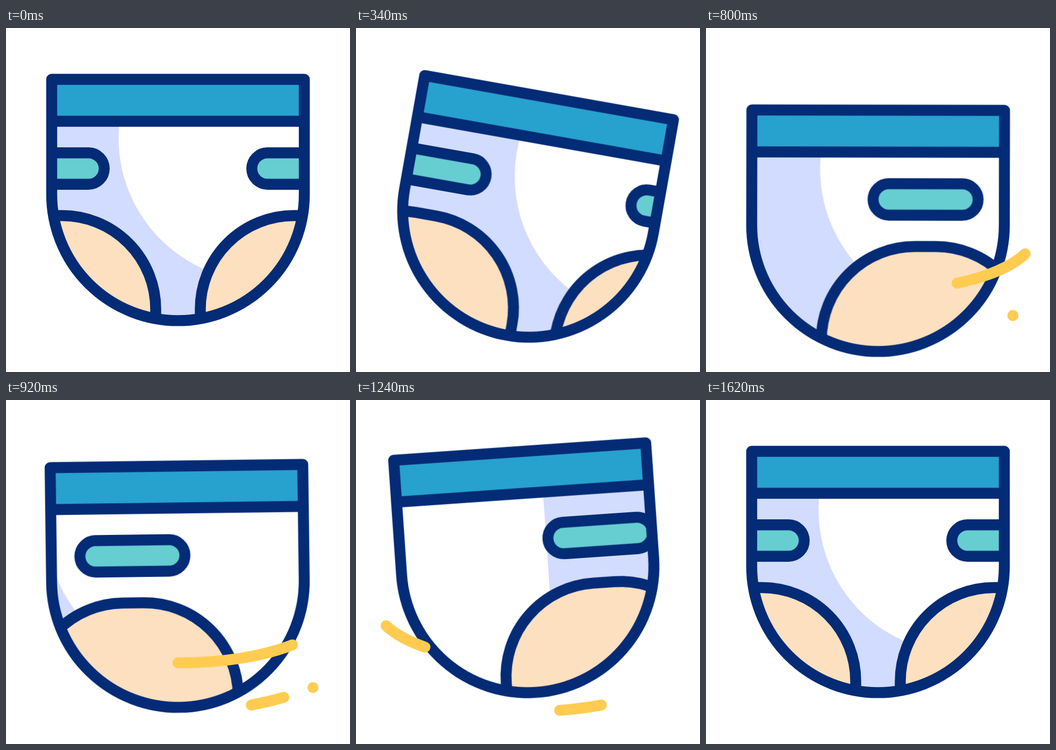
Recreate the animation shown at these times as an HTML page. Size 640 by 640 pixels, loop 2.4 s.

```html
<!DOCTYPE html>
<html lang="en">
<head>
<meta charset="utf-8">
<title>Spinning diaper</title>
<style>
  @property --tail { syntax: "<length>"; inherits: false; initial-value: 0px; }
  @property --lead { syntax: "<length>"; inherits: false; initial-value: 0px; }

  :root {
    --navy: #042b76;
    --ease: cubic-bezier(.333, 0, .667, 1);
    --rush: cubic-bezier(.333, .1, .667, .5);
  }
  html, body { margin: 0; width: 100%; height: 100%; overflow: hidden; background: #fff; }
  svg { display: block; width: 100vw; height: 100vh; }

  .line { stroke: var(--navy); stroke-width: 20.4; stroke-linecap: round; stroke-linejoin: round; }
  .hole { fill: #fde0bf; }
  .tab { fill: #66cdd1; }
  .shade { fill: #d2dcfe; }
  .band { fill: #27a1cd; }
  .streak {
    fill: none; stroke: #ffcc51; stroke-width: 20.4; stroke-linecap: round;
    stroke-dasharray: max(0px, var(--lead) - var(--tail)) 3000px;
    stroke-dashoffset: calc(-1 * var(--tail));
  }

  .drop, .tilt, .spin, .shade { animation: 2400ms var(--ease) infinite; }
  .drop { animation-name: drop; }
  .tilt { animation-name: tilt; transform-origin: 320px 320px; }
  .spin { animation-name: spin; }
  .out { animation-name: shade-out; }
  .in { animation-name: shade-in; }

  @keyframes drop {
    0%, 45.1%, 100% { transform: translateY(0); }
    29.9% { transform: translateY(66.2px); }
  }
  @keyframes tilt {
    0%, 33.75%, 67.5%, 100% { transform: rotate(0deg); }
    25.3% { transform: rotate(17deg); }
    50.6% { transform: rotate(-4deg); }
  }
  @keyframes spin {
    0% { transform: translateX(0); }
    25.3% { transform: translateX(80px); animation-timing-function: cubic-bezier(.333, 0, .667, .333); }
    28.33% { transform: translateX(27.5px); animation-timing-function: linear; }
    57.58% { transform: translateX(-981.7px); animation-timing-function: cubic-bezier(.333, .667, .667, 1); }
    67.5%, 100% { transform: translateX(-1153px); }
  }
  @keyframes shade-out {
    0% { transform: translateX(0); }
    25.3% { transform: translateX(117px); }
    50.6%, 100% { transform: translateX(-358px); }
  }
  @keyframes shade-in {
    0%, 33.75% { transform: translateX(1323px); }
    67.5%, 100% { transform: translateX(0); }
  }

  .long, .short { animation: 2400ms var(--rush) var(--at) infinite both; }
  .long { animation-name: long-lead, long-tail, long-show; }
  .short { animation-name: short-lead, short-tail, short-show; }

  @keyframes long-lead { 0% { --lead: 0px; } 20.42%, 100% { --lead: 1000px; } }
  @keyframes long-tail { 0%, 8.04% { --tail: 0px; } 28.46%, 100% { --tail: 1000px; } }
  @keyframes long-show {
    0% { opacity: 1; animation-timing-function: step-end; }
    28.46%, 100% { opacity: 0; }
  }
  @keyframes short-lead { 0% { --lead: 0px; } 13.33%, 100% { --lead: 1000px; } }
  @keyframes short-tail { 0%, 1.96% { --tail: 0px; } 15.29%, 100% { --tail: 1000px; } }
  @keyframes short-show {
    0% { opacity: 1; animation-timing-function: step-end; }
    15.29%, 100% { opacity: 0; }
  }
  /* Nothing shows before the first run of a streak. */
  .wait { animation: wait 2400ms step-end infinite; }
  @keyframes wait { 0% { visibility: hidden; } 25.3%, 100% { visibility: visible; } }
</style>
</head>
<body>
<svg viewBox="0 0 640 640">
  <defs>
    <path id="shell" d="M85 95.5H555V309.5A235 235 0 0 1 85 309.5Z"/>
    <clipPath id="inside"><use href="#shell"/></clipPath>
    <path id="shadow" d="M-240 160H213.3A266 266 0 0 0 475.5 471V560H-240Z"/>
    <g id="hip" class="line">
      <path class="hole" d="M-193.5 620V523A174 174 0 0 1 -19.5 349H19.5A174 174 0 0 1 193.5 523V620Z"/>
      <rect class="tab" x="-97.7" y="232.3" width="195.4" height="58.4" rx="29.2"/>
    </g>
    <g id="hips">
      <use href="#hip" x="85"/>
      <use href="#hip" x="555"/>
    </g>
  </defs>

  <g class="drop">
    <g class="tilt">
      <use href="#shell" fill="#fff"/>
      <g clip-path="url(#inside)">
        <use class="shade out" href="#shadow"/>
        <use class="shade in" href="#shadow"/>
        <g class="spin">
          <use href="#hips"/>
          <use href="#hips" x="1153"/>
        </g>
      </g>
      <path class="band" d="M85 95.5H555V173.5H85Z"/>
      <path class="line" fill="none" d="M85 173.5H555"/>
      <use href="#shell" class="line" fill="none"/>
    </g>
  </g>

  <g class="wait">
    <path class="streak long" style="--at: 607ms" pathLength="1000" d="M594 420A290 110 0 0 1 56 420"/>
    <path class="streak short" style="--at: 805ms" pathLength="1000" d="M571 535A500 356 0 0 1 38 512"/>
    <path class="streak short" style="--at: 1078ms" pathLength="1000" d="M571 535A500 356 0 0 1 38 512"/>
  </g>
</svg>
</body>
</html>
```
